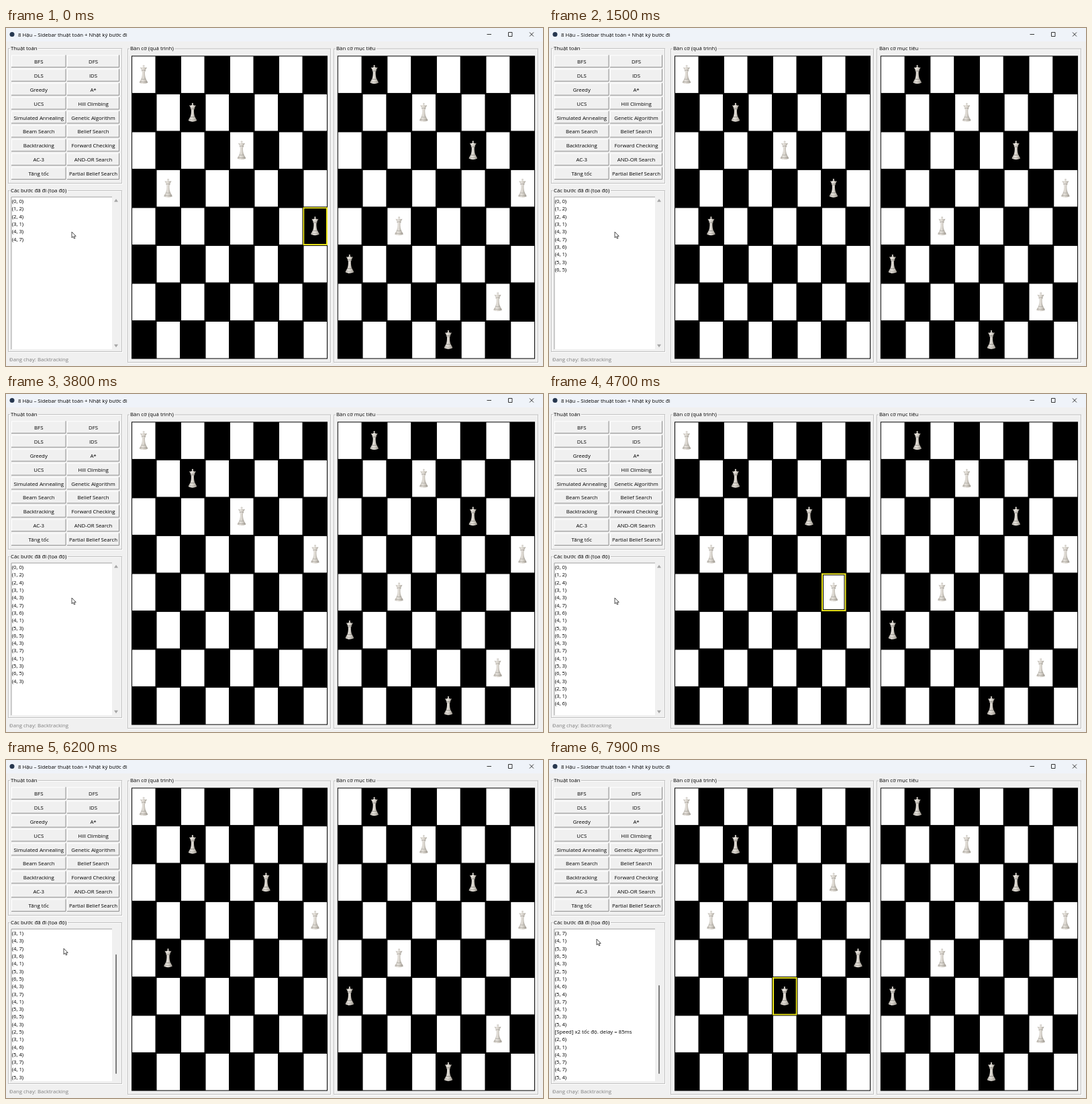
Recreate the animation shown at these times as an HTML page. Size 800x504 px, loop 8000 ms.

```html
<!DOCTYPE html>
<html lang="vi">
<head>
<meta charset="utf-8">
<title>8 Hậu</title>
<style>
  html, body { margin: 0; width: 100%; height: 100%; overflow: hidden; background: #f0f0f0; }
  svg { display: block; width: 800px; height: 504px; }
  text { font: 7.8px "Open Sans", "Noto Sans", sans-serif; fill: #000; white-space: pre; }
  .mid { text-anchor: middle; }
  .caption { paint-order: stroke; stroke: #f0f0f0; stroke-width: 4px; }
  .status { fill: #808080; }
</style>
</head>
<body>
<svg id="stage" viewBox="0 0 800 504" xmlns="http://www.w3.org/2000/svg">
  <defs>
    <linearGradient id="ivory">
      <stop offset="0" stop-color="#b9b4ac"/>
      <stop offset=".35" stop-color="#e6e2dc"/>
      <stop offset=".65" stop-color="#d0cbc3"/>
      <stop offset="1" stop-color="#9f9a92"/>
    </linearGradient>
    <g id="queen" fill="url(#ivory)">
      <circle cy="-12.9" r="1.2"/>
      <path d="M-5-10.6L-2.4-10.2 0-11.9 2.4-10.2 5-10.6 2.7-6.2H-2.7Z"/>
      <path d="M-3.2-6.2H3.2L2.6-4.6H-2.6Z"/>
      <path d="M-2.1-4.6C-1.7 0-2.4 4-3.6 7H3.6C2.4 4 1.7 0 2.1-4.6Z"/>
      <path d="M-3.8 7C-4.4 9.4-6.2 10-6.2 12.6Q0 15.2 6.2 12.6C6.2 10 4.4 9.4 3.8 7Z"/>
      <path d="M-2.7-6.1H2.7M-3.6 7.2H3.6M-5.4 10.6Q0 12.4 5.4 10.6" fill="none" stroke="#8d8880" stroke-width=".5"/>
    </g>
  </defs>
  <rect width="800" height="504" fill="#f0f0f0"/>
  <rect width="800" height="20" fill="#eff3f9"/>
  <circle cx="9" cy="9.5" r="3.5" fill="#26374f"/>
  <text x="18" y="12.6">8 Hậu – Sidebar thuật toán + Nhật ký bước đi</text>
  <path d="M716.5 9.5H723M748.5 6.5h5.5v6h-5.5ZM780 6.5l6 6M786 6.5l-6 6" fill="none" stroke="#222" stroke-width=".9"/>
  <g id="chrome"></g>
  <g id="log"></g>
  <g id="bar"></g>
  <g id="boards"></g>
  <g id="pieces"></g>
  <path id="cursor" d="M0 0V8.7L2 6.9 3.4 10 4.9 9.4 3.6 6.4H6.2Z" fill="#fff" stroke="#222" stroke-width=".8"/>
  <text class="status" x="5" y="496.8">Đang chạy: Backtracking</text>
</svg>
<script>
const LOOP = 8000, TICK = 100, N = 8;
const el = id => document.getElementById(id);
const rect = (x, y, w, h, attrs) => `<rect x="${x}" y="${y}" width="${w}" height="${h}" ${attrs}/>`;
const text = (x, y, s, cls = '') => `<text class="${cls}" x="${x}" y="${y}">${s}</text>`;

// Window parts
function group(x, y, x2, y2, label) {
  const w = x2 - x, h = y2 - y;
  return rect(x + 1.5, y + 1.5, w, h, 'fill="none" stroke="#fff"') +
    rect(x + .5, y + .5, w, h, 'fill="none" stroke="#c0c0c0"') +
    text(x + 4, y + 2.6, label, 'caption');
}

function button(x, y, w, label) {
  const h = 18.6;
  return rect(x, y, w, h, 'fill="#f0f0f0"') +
    `<path d="M${x + .5} ${y + h}V${y + .5}H${x + w}" fill="none" stroke="#fff"/>` +
    `<path d="M${x} ${y + h - .5}H${x + w - .5}V${y}" fill="none" stroke="#8c8c8c"/>` +
    text(x + w / 2, y + 12.6, label, 'mid');
}

const names = ['BFS', 'DFS', 'DLS', 'IDS', 'Greedy', 'A*', 'UCS', 'Hill Climbing',
  'Simulated Annealing', 'Genetic Algorithm', 'Beam Search', 'Belief Search',
  'Backtracking', 'Forward Checking', 'AC-3', 'AND-OR Search', 'Tăng tốc', 'Partial Belief Search'];

el('chrome').innerHTML =
  group(3, 30, 172, 231, 'Thuật toán') +
  group(3, 242, 172, 482, 'Các bước đã đi (tọa độ)') +
  group(181, 30.5, 483, 498, 'Bàn cờ (quá trình)') +
  group(488, 30.5, 792, 498, 'Bàn cờ mục tiêu') +
  names.map((s, i) => button(i % 2 ? 91 : 8, 40.3 + 20.9 * (i >> 1), i % 2 ? 78 : 81.5, s)).join('') +
  rect(8, 252, 150, 227, 'fill="#fff"') +
  '<path d="M8 479V252H158" fill="none" stroke="#a0a0a0"/>';

// Boards
const live = { x: 187, y: 41.4, w: 36.5, h: 56.5 };
const goal = { x: 493.8, y: 41.4, w: 36.78, h: 56.5 };

function grid(b) {
  let out = rect(b.x, b.y, b.w * N, b.h * N, 'fill="#000"');
  for (let r = 0; r < N; r++)
    for (let c = r % 2; c < N; c += 2)
      out += rect(b.x + c * b.w + 1, b.y + r * b.h + 1, b.w - 2, b.h - 2, 'fill="#fff"');
  return out;
}

const queens = (b, cols) => cols.map((c, r) =>
  `<use href="#queen" x="${b.x + (c + .5) * b.w - .3}" y="${b.y + (r + .5) * b.h - .4}"/>`).join('');

function highlight(b, r, c) {
  const x = b.x + c * b.w, y = b.y + r * b.h;
  return rect(x + 1, y + 1, b.w - 2, b.h - 2, 'fill="none" stroke="#f0ea1c" stroke-width="2"') +
    rect(x + 2.5, y + 2.5, b.w - 5, b.h - 5, 'fill="none" stroke="#000"');
}

el('boards').innerHTML = grid(live) + grid(goal) + queens(goal, [1, 3, 5, 7, 2, 0, 6, 4]);

// Backtracking search: one step per placed or removed queen
function* solve(cols = []) {
  const r = cols.length;
  if (r === N) return;
  for (let c = 0; c < N; c++) {
    if (cols.some((q, i) => q === c || Math.abs(q - c) === r - i)) continue;
    const next = [...cols, c];
    yield { cols: next, placed: true };
    yield* solve(next);
    yield { cols, placed: false };
  }
}

const FIRST = 6, FAST_FROM = 40, SPEED_AT = 7070;
const stepTime = k => -75 + 181 * Math.min(k, FAST_FROM) + 97 * Math.max(0, k - FAST_FROM);

function timeline() {
  const states = [];
  let lines = [], k = -FIRST;
  for (const { cols, placed } of solve()) {
    const at = stepTime(k++);
    if (at >= LOOP) break;
    const r = cols.length - 1;
    if (placed) lines = [...lines, `(${r}, ${cols[r]})`];
    states.push({ at, cols, placed, lines });
    if (k === FAST_FROM) {
      lines = [...lines, '[Speed] x2 tốc độ. delay = 85ms'];
      states.push({ at: SPEED_AT, cols, placed, lines });
    }
  }
  return states;
}

const states = timeline(), ROWS = 20;

function scrollbar(total) {
  if (total <= ROWS)
    return '<path d="M161 259.2L164 254.8 167 259.2ZM161 471.8L164 476.2 167 471.8Z" fill="#a6a6a6"/>';
  const top = 263 + 205 * (total - ROWS) / total;
  return rect(163, top, 2, 468 - top, 'rx="1" fill="#7c7c7c"');
}

function show({ cols, placed, lines }) {
  const r = cols.length - 1;
  el('pieces').innerHTML = (placed ? highlight(live, r, cols[r]) : '') + queens(live, cols);
  el('log').innerHTML = lines.slice(-ROWS).map((s, i) => text(8.7, 261.2 + 11.29 * i, s)).join('');
  el('bar').innerHTML = scrollbar(lines.length);
}

// Pointer stops: time, x, y
const stops = [[0, 98, 304], [5700, 98, 304], [6200, 86, 281], [6850, 52, 216], [7250, 52, 216], [7900, 71, 267], [LOOP, 71, 267]];

function pointer(t) {
  const i = stops.findIndex(s => s[0] > t);
  const [t0, x0, y0] = stops[i - 1], [t1, x1, y1] = stops[i];
  const p = (t - t0) / (t1 - t0), e = p * p * (3 - 2 * p);
  return `translate(${x0 + (x1 - x0) * e} ${y0 + (y1 - y0) * e})`;
}

const start = performance.now();
let shown;

function frame() {
  const t = Math.floor((performance.now() - start) % LOOP / TICK) * TICK;
  const state = states.findLast(s => s.at <= t);
  if (state !== shown) show(shown = state);
  el('cursor').setAttribute('transform', pointer(t));
  requestAnimationFrame(frame);
}
frame();
</script>
</body>
</html>
```
